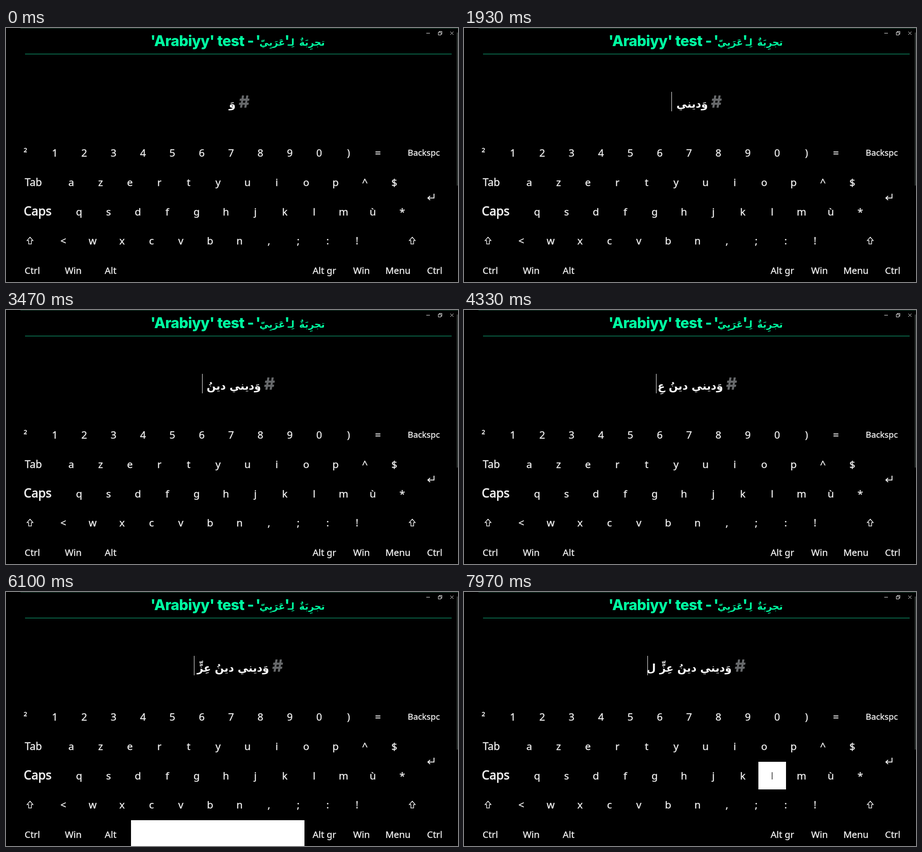
Recreate the animation shown at these times as an HTML page. Size 998x561 px, loop 8 s.

```html
<!DOCTYPE html>
<html lang="en">
<head>
<meta charset="utf-8">
<title>Keyboard test</title>
<style>
  html, body { margin: 0; width: 100%; height: 100%; overflow: hidden; background: #000; }
  svg { display: block; width: 100%; height: 100%; }
  .latin { font: 800 32.3px Inter, sans-serif; letter-spacing: -.02em; }
  .arabic { font: 700 21px "DejaVu Sans", sans-serif; direction: rtl; }
  #title { fill: #00ffa2; }
  #hash { font: 800 37px Inter, sans-serif; fill: #66686a; text-anchor: end; }
  #typed { font-size: 23.7px; fill: #fff; }
  #keys { font: 22.5px "Noto Sans", "Open Sans", sans-serif; fill: #eee; stroke: #eee; stroke-width: .4; text-anchor: middle; }
  #keys .label { font-size: 20.5px; }
  #keys .tab { font-size: 23px; }
  #keys .caps { font-size: 26.8px; stroke-width: .9; }
  #keys .small { font-size: 18.7px; }
  #keys .pressed { fill: #555; stroke: none; }
  .icon { fill: none; stroke: #eee; }
</style>
</head>
<body>
<svg viewBox="0 0 998 561" preserveAspectRatio="none">
  <rect width="998" height="561"/>
  <path d="M32 .5H998" stroke="#1d4a38"/>
  <path d="M42 57.5H984" stroke="#12bd86"/>
  <rect x="995" y="10" width="3" height="338" fill="#2b302e"/>
  <path class="icon" d="M928 11.5h8M954.500 9.500h6v6h-6zM956.500 9.500v-2h6v6h-2M981 8l7 7M988 8l-7 7"/>

  <g id="title">
    <text class="latin" x="319" y="40">'Arabiyy' test -</text>
    <text class="latin" x="551" y="40">'</text>
    <text class="arabic" x="616" y="39">عَرَبِيّ</text>
    <text class="latin" x="615" y="40">'</text>
    <text class="arabic" x="637" y="39">لِـ</text>
    <text class="arabic" x="704" y="39">تجرِبَةٌ</text>
  </g>

  <text id="hash" y="176">#</text>
  <text id="typed" class="arabic" y="176"></text>
  <rect id="caret" y="141" width="1" height="43" fill="#fff"/>

  <rect id="glow" fill="#fff" visibility="hidden"/>
  <g id="keys"></g>
  <path class="icon" stroke-width="1.5" d="M53 462l-6.500 7.500h3.500v7.500h6v-7.500h3.500zM897 462l-6.500 7.500h3.500v7.500h6v-7.500h3.500z"/>
  <path class="icon" stroke-width="2" d="M945 366v9.500h-13M936.500 371l-5 4.500 5 4.500"/>
</svg>
<script>
const LOOP = 8000, BLINK = 530, HOLD = 115, CENTER = 513, PITCH = 64.85, KEY = 61;
const $ = id => document.getElementById(id);
const keys = {};

function addKey(name, x, baseline, style = '') {
  const el = document.createElementNS('http://www.w3.org/2000/svg', 'text');
  el.textContent = name;
  el.setAttribute('x', x);
  el.setAttribute('y', baseline);
  el.setAttribute('class', style);
  $('keys').append(el);
  keys[name] = { el, x: Math.round(x - KEY / 2), y: baseline - 39, w: KEY };
}

[
  ['²1234567890)=', 43, 284],
  ['azertyuiop^$', 144, 349],
  ['qsdfghjklmù*', 161.500, 414],
  ['<wxcvbn,;:!', 126.500, 478],
].forEach(([row, x, y]) => [...row].forEach((c, i) => addKey(c, x + i * PITCH, y)));

addKey('Backspc', 922.500, 282, 'small');
addKey('Tab', 60.500, 349, 'tab');
addKey('Caps', 70, 414, 'caps');
[['Ctrl', 58], ['Win', 148.500], ['Alt', 231], ['Alt gr', 703], ['Win', 785], ['Menu', 865.500], ['Ctrl', 946.500]]
  .forEach(([name, x]) => addKey(name, x, 543, 'label'));
keys[' '] = { x: 276, y: 504, w: 383 };

// time, key, typed characters ("<" removes the previous one), half width of the line
const KASRA = '\u0650', KASRATAN = '\u064d', DAMMA = '\u064f', SHADDA = '\u0651';
const strokes = [
  [-700, '', 'و\u064e', 24],
  [260, 'd', 'د', 31],
  [560, 'i', KASRA, 31],
  [800, 'i', '<ي', 41],
  [1160, 'n', 'ن', 44],
  [1360, 'i', KASRA, 44],
  [1540, 'i', '<ي', 52],
  [1800, ' ', ' ', 55.500],
  [2040, 'd', 'د', 62.500],
  [2230, 'i', KASRA, 62.500],
  [2400, 'i', '<ي', 73],
  [2700, 'n', 'ن', 76.500],
  [2930, 'o', DAMMA, 76.500],
  [3200, ' ', ' ', 80],
  [3720, '3', 'ع', 89],
  [4000, 'i', KASRA, 89],
  [4480, 'z', 'ز', 94.500],
  [5010, 'z', SHADDA, 94.500],
  [5350, 'i', KASRA, 94.500],
  [5600, 'n', '<' + KASRATAN, 94.500],
  [6030, ' ', ' ', 98],
  [7900, 'l', 'ل', 108],
];

let line = '';
const states = strokes.map(([time, key, added, half]) => {
  line = added[0] === '<' ? line.slice(0, -1) + added.slice(1) : line + added;
  return { time, key, half, text: line };
});

let shown, lit;

function showLine(state) {
  if (state === shown) return;
  shown = state;
  $('typed').textContent = state.text;
  $('typed').setAttribute('x', CENTER + state.half - 30);
  $('hash').setAttribute('x', CENTER + state.half + 1);
  $('caret').setAttribute('x', Math.round(CENTER - state.half));
}

function light(key) {
  if (key === lit) return;
  lit?.el?.classList.remove('pressed');
  lit = key;
  $('glow').setAttribute('visibility', key ? 'visible' : 'hidden');
  if (!key) return;
  key.el?.classList.add('pressed');
  $('glow').setAttribute('x', key.x);
  $('glow').setAttribute('y', key.y);
  $('glow').setAttribute('width', key.w);
  $('glow').setAttribute('height', KEY);
}

function draw(now) {
  const t = now % LOOP;
  const state = states.findLast(s => s.time <= t);
  const age = t - state.time;
  showLine(state);
  light(age < HOLD ? keys[state.key] : undefined);
  $('caret').setAttribute('visibility', Math.floor(age / BLINK) % 2 ? 'hidden' : 'visible');
}

const start = performance.now();
function tick() {
  draw(performance.now() - start);
  requestAnimationFrame(tick);
}
tick();
</script>
</body>
</html>
```
